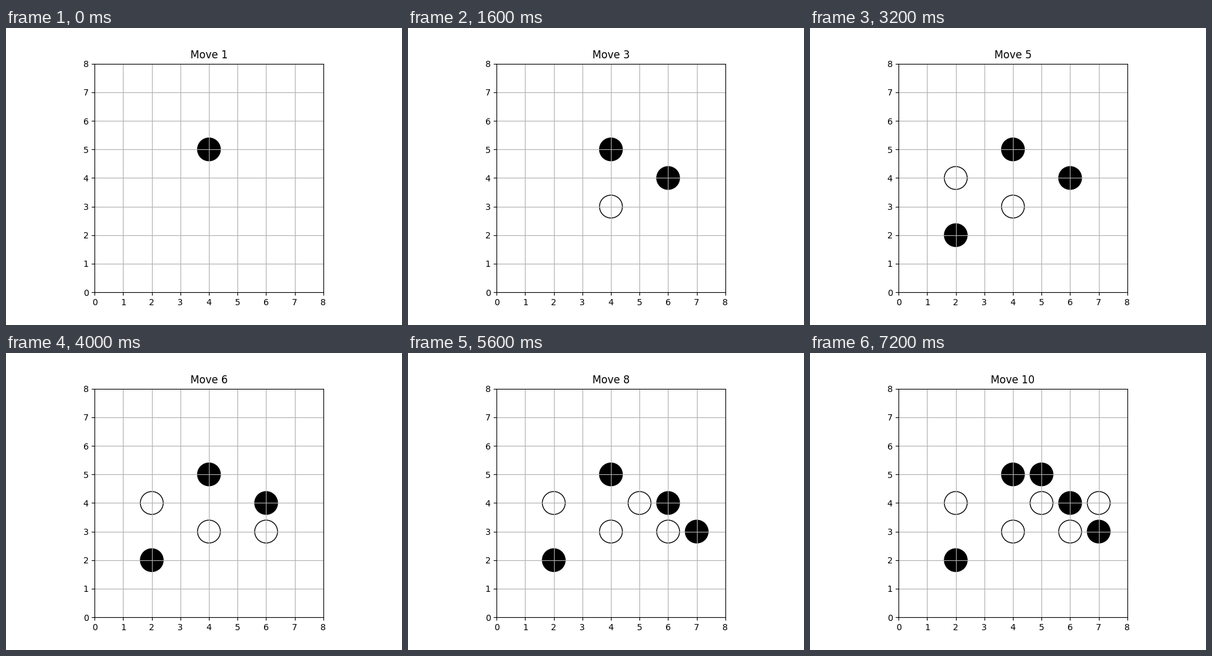
Animation, 640 px wide and 480 px high, one loop 8 s. Source, as a matplotlib script:

```python
from itertools import cycle

import matplotlib.pyplot as plt
from matplotlib.animation import FuncAnimation
from matplotlib.patches import Circle

SIZE = 8
RADIUS = 0.4
STEP_MS = 800

# The game itself: one key point per move, black first, colours alternating.
MOVES = [(4, 5), (4, 3), (6, 4), (2, 4), (2, 2),
         (6, 3), (7, 3), (5, 4), (5, 5), (7, 4)]


def make_board():
    fig, ax = plt.subplots(figsize=(6.4, 4.8), dpi=100)
    ax.set(xlim=(0, SIZE), ylim=(0, SIZE), aspect="equal",
           xticks=range(SIZE + 1), yticks=range(SIZE + 1))
    ax.grid(True)
    return fig, ax


def add_stone(ax, pos, fill):
    return ax.add_patch(Circle(pos, RADIUS, facecolor=fill, edgecolor="black"))


fig, ax = make_board()
title = ax.set_title("Move 1")
stones = [add_stone(ax, pos, fill)
          for pos, fill in zip(MOVES, cycle(["black", "white"]))]


def draw(frame):
    for i, stone in enumerate(stones):
        stone.set_visible(i <= frame)
    title.set_text(f"Move {frame + 1}")
    return [*stones, title]


anim = FuncAnimation(fig, draw, frames=len(MOVES), interval=STEP_MS,
                     repeat=True, repeat_delay=0, blit=False)
plt.show()
```
